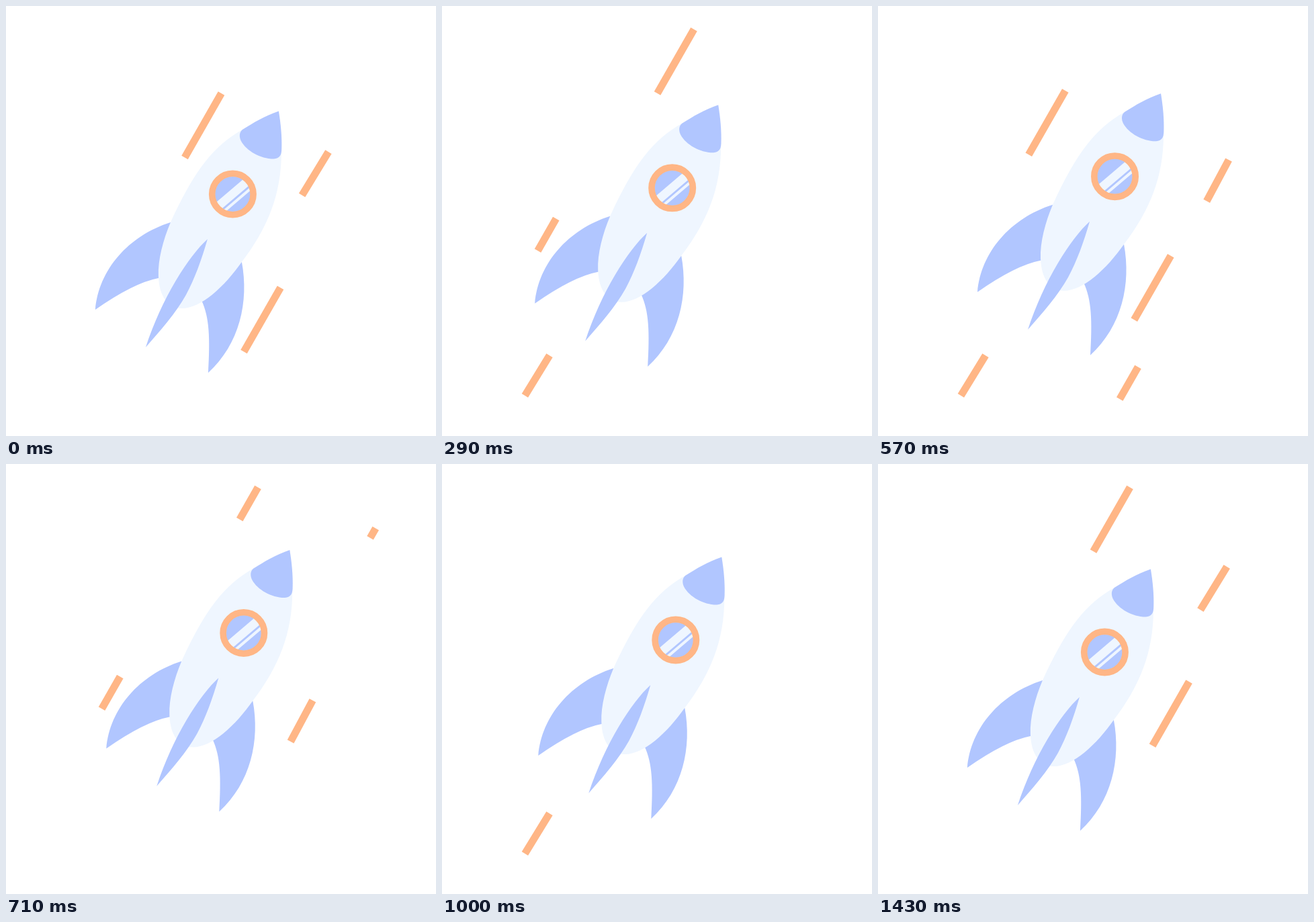
Write an HTML page with a canvas that moves like this. It is 640 by 640 pixels and loops after 1.5 s.

```html
<!DOCTYPE html>
<html lang="en">
<head>
<meta charset="utf-8">
<title>Rocket</title>
<style>
  html, body { margin: 0; width: 100%; height: 100%; overflow: hidden; background: #fff; }
  canvas { display: block; width: 100vmin; height: 100vmin; }
</style>
</head>
<body>
<canvas id="stage" width="640" height="640"></canvas>
<script>
const ctx = document.getElementById('stage').getContext('2d');
const LOOP = 1500, STEPS = 21;
const BLUE = '#b1c6ff', PALE = '#eff6ff', ORANGE = '#ffb686';

const body = new Path2D('M352 184C310 207 280 245 245 322C234 348 226 378 227 402' +
  'C228 432 241 450 262 450C290 450 325 418 351 381C390 330 410 280 410 217L400 180Z');
const nose = new Path2D('M406 156.5C386 163 368 174 352 184C347 188 347 195 350 201' +
  'C358 216 380 228 399 227.5C407 227 410 222 410.3 214C411 194 409 175 406 156.5Z');
const sideFins = new Path2D('M245 322C182 342 138 393 133 452Q190 412 227 405L250 400Z' +
  'M351 381C362 440 348 503 301 546C304 495 303 463 291 438L310 400Z');
const middleFin = new Path2D('M300 347C272 372 232 435 208 508' +
  'C230 483 253 457 268 430C281 406 291 378 300 347Z');

// A streak runs down its track one dash length per step, cut off at both ends.
const LONG = { dx: -54.5, dy: 95.3, span: 2.5 };
const SHORT = { dx: -36.6, dy: 59.6, span: 3 };
const streaks = [
  { x: 375, y: 34.8, ...LONG, starts: [4, 10.5, 20] },
  { x: 278.8, y: 126, ...LONG, starts: [2, 8] },
  { x: 221, y: 187.2, ...LONG, starts: [15.5] },
  { x: 550.2, y: 95.7, ...LONG, starts: [10.85, 15.5] },
  { x: 463, y: 324, ...LONG, starts: [7.5, 20] },
  { x: 418.2, y: 342.7, ...LONG, starts: [1.5] },
  { x: 496, y: 346.7, ...LONG, starts: [6] },
  { x: 233.2, y: 401, ...SHORT, starts: [2, 6, 12] },
  { x: 498.6, y: 319.3, ...SHORT, starts: [15] },
  { x: 558.5, y: 88.4, dx: -39.3, dy: 64.4, span: 3, starts: [19] },
  { x: 522, y: 229, dx: -32.8, dy: 61.4, span: 3, starts: [8] }
];
const hiddenStreak = { x: 431.5, y: 210.2, ...SHORT, starts: [2] };

function drawStreak({ x, y, dx, dy, span, starts }, step) {
  for (const start of starts) {
    for (const pos of [step - start, step + STEPS - start]) {
      const from = Math.max(0, pos), to = Math.min(span, pos + 1);
      if (to <= from) continue;
      ctx.beginPath();
      ctx.moveTo(x + dx * from, y + dy * from);
      ctx.lineTo(x + dx * to, y + dy * to);
      ctx.lineWidth = 11;
      ctx.strokeStyle = ORANGE;
      ctx.stroke();
    }
  }
}

// cubic-bezier(.42, 0, .58, 1)
function easeInOut(p) {
  let lo = 0, hi = 1;
  for (let i = 0; i < 24; i++) {
    const u = (lo + hi) / 2, v = 1 - u;
    if (3 * v * v * u * 0.42 + 3 * v * u * u * 0.58 + u * u * u < p) lo = u; else hi = u;
  }
  return lo * lo * (3 - 2 * lo);
}

function fill(path, color) {
  ctx.fillStyle = color;
  ctx.fill(path);
}

function drawWindow() {
  ctx.save();
  ctx.translate(337.5, 280);
  const disc = new Path2D();
  disc.arc(0, 0, 30.7, 0, Math.PI * 2);
  fill(disc, BLUE);
  ctx.save();
  ctx.clip(disc);
  ctx.rotate(-0.705);
  ctx.fillStyle = PALE;
  ctx.fillRect(-40, -6.7, 80, 12.8);
  ctx.fillRect(-40, 9, 80, 4.1);
  ctx.restore();
  ctx.lineWidth = 9.6;
  ctx.strokeStyle = ORANGE;
  ctx.stroke(disc);
  ctx.restore();
}

function drawRocket(lift) {
  ctx.save();
  ctx.translate(16.4 * lift - 0.1, -28.5 * lift);
  fill(sideFins, BLUE);
  fill(body, PALE);
  fill(nose, BLUE);
  fill(middleFin, BLUE);
  drawWindow();
  ctx.restore();
}

function render() {
  const time = performance.now() % LOOP;
  const step = Math.floor((Math.floor(time / 10) + 0.5) * STEPS * 10 / LOOP);
  const phase = Math.abs(step * LOOP / STEPS - 707) / 695;
  ctx.clearRect(0, 0, 640, 640);
  drawStreak(hiddenStreak, step);
  drawRocket(easeInOut(Math.max(0, 1 - phase)));
  streaks.forEach(streak => drawStreak(streak, step));
  requestAnimationFrame(render);
}
render();
</script>
</body>
</html>
```
